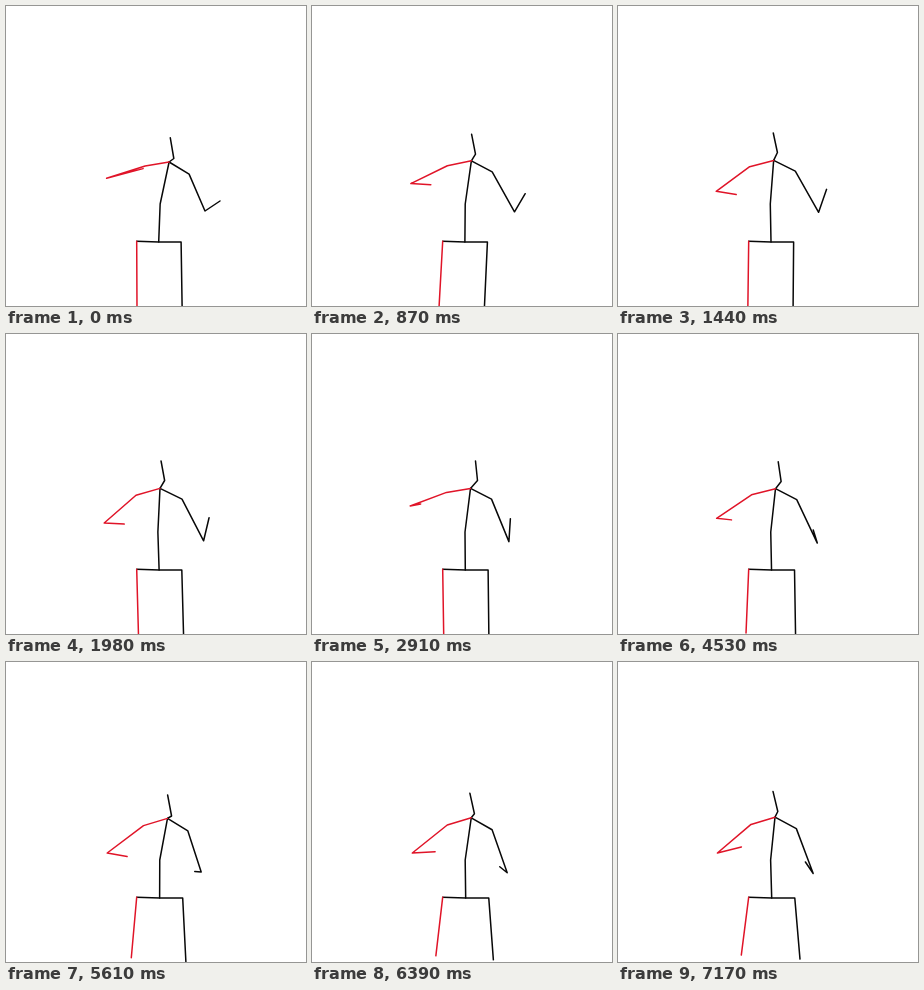
Write an HTML page with a canvas that moves like this. It is 300 px wide and 300 px high and loops after 7200 ms.

```html
<!DOCTYPE html>
<html lang="en">
<head>
<meta charset="utf-8">
<title>Gesturing stick figure</title>
<style>
html, body { margin: 0; width: 100%; height: 100%; overflow: hidden; background: #fff; }
canvas { display: block; width: 300px; height: 300px; }
</style>
</head>
<body>
<canvas id="stage"></canvas>
<script>
const LOOP = 7200, STEP = 30;
const BLACK = '#080808', RED = '#e01428';

const canvas = document.getElementById('stage');
const ctx = canvas.getContext('2d');
const ratio = window.devicePixelRatio || 1;
canvas.width = canvas.height = 300 * ratio;
ctx.scale(ratio, ratio);

// Eases between turning points given as [seconds, value].
function swing(...points) {
  return s => {
    const next = points.findIndex(p => p[0] > s);
    if (next === 0) return points[0][1];
    if (next < 0) return points[points.length - 1][1];
    const [t0, a] = points[next - 1], [t1, b] = points[next];
    const u = (s - t0) / (t1 - t0);
    return a + (b - a) * u * u * (3 - 2 * u);
  };
}

// Torso: sideways lean, forward bow, head turn.
const lean = swing([0, 163.1], [1.98, 154], [2.91, 158.5], [4.53, 157.5], [5.61, 161.5], [7.17, 157]);
const bow = swing([0, 0.8], [1.3, 0], [4.2, 0], [5.61, 1], [7.17, 0.4]);
const turn = swing([0, 1.2], [1.5, -0.4], [2.91, 5], [7.17, -2]);

// Arms: height of the red wrist, fold of its hand, the other wrist and hand.
const reach = swing([0.2, 172.3], [1.98, 189], [2.91, 172], [5.61, 191]);
const foldX = swing([0, 36.5], [0.87, 20], [1.98, 20], [2.91, 10.5], [7.17, 24]);
const foldY = swing([0, -9.7], [1.2, 3.5], [2.91, -2], [5.61, 3.5], [7.17, -6]);
const wristX = swing([0, 199], [0.87, 202.5], [2.4, 196.5], [4.53, 199.3], [5.61, 195.2]);
const lift = swing([0, -10], [1.5, -23], [3.6, -23], [5.61, -0.5], [7.17, -11.5]);

// Legs: common sway and the distance between the feet.
const sway = swing([0, 131], [0.87, 127], [1.98, 132.5], [7.17, 123.3]);
const spread = swing([2.91, 45.2], [7.17, 58.7]);

const add = ([x, y], dx, dy) => [x + dx, y + dy];

function line(color, ...points) {
  ctx.strokeStyle = color;
  ctx.beginPath();
  points.forEach(p => ctx.lineTo(...p));
  ctx.stroke();
}

function draw(s) {
  ctx.fillStyle = '#fff';
  ctx.fillRect(0, 0, 300, 300);
  ctx.lineWidth = 1.5;
  ctx.lineCap = ctx.lineJoin = 'round';

  const progress = s * 1000 / LOOP;
  const drift = Math.sin(progress * Math.PI / 2);
  const x = lean(s), b = bow(s), look = turn(s);

  const redHip = [130.7, 235.2];
  const pelvis = [152.7 + drift, 235.9];
  const hip = [175.1 + 1.7 * drift, 236.1];
  const spine = [153 + (x - 158.5) / 4, 198];
  const chest = [x, 154.4 + 2 * b];
  const neck = [x + 4 + 0.6 * look, 146.5 + 7.5 * b];
  const head = [x + look, 127 + 6 * b];

  const redWrist = [98.2 + 3 * b, reach(s)];
  const redElbow = add(chest, -24, 4 + (redWrist[1] - 172) * 0.17);
  const redHand = add(redWrist, foldX(s), foldY(s));

  const elbow = add(chest, 22 - (x - 154) * 0.22, 10.7 + 1.8 * b);
  const wrist = [wristX(s), 205 + 6.5 * progress];
  const hand = add(wrist, 15 - 22.8 * drift, lift(s));

  const gap = spread(s);
  const redFoot = [sway(s), 302 - (gap - 45) * 0.65];
  const foot = add(redFoot, gap, 4);

  line(BLACK, redHip, pelvis, hip, foot);
  line(RED, redHip, redFoot);
  line(BLACK, pelvis, spine, chest, neck, head);
  line(BLACK, chest, elbow, wrist, hand);
  line(RED, chest, redElbow, redWrist, redHand);
}

const start = performance.now();
function tick() {
  const t = (performance.now() - start) % LOOP;
  draw(Math.floor(t / STEP) * STEP / 1000);
  requestAnimationFrame(tick);
}
tick();
</script>
</body>
</html>
```
